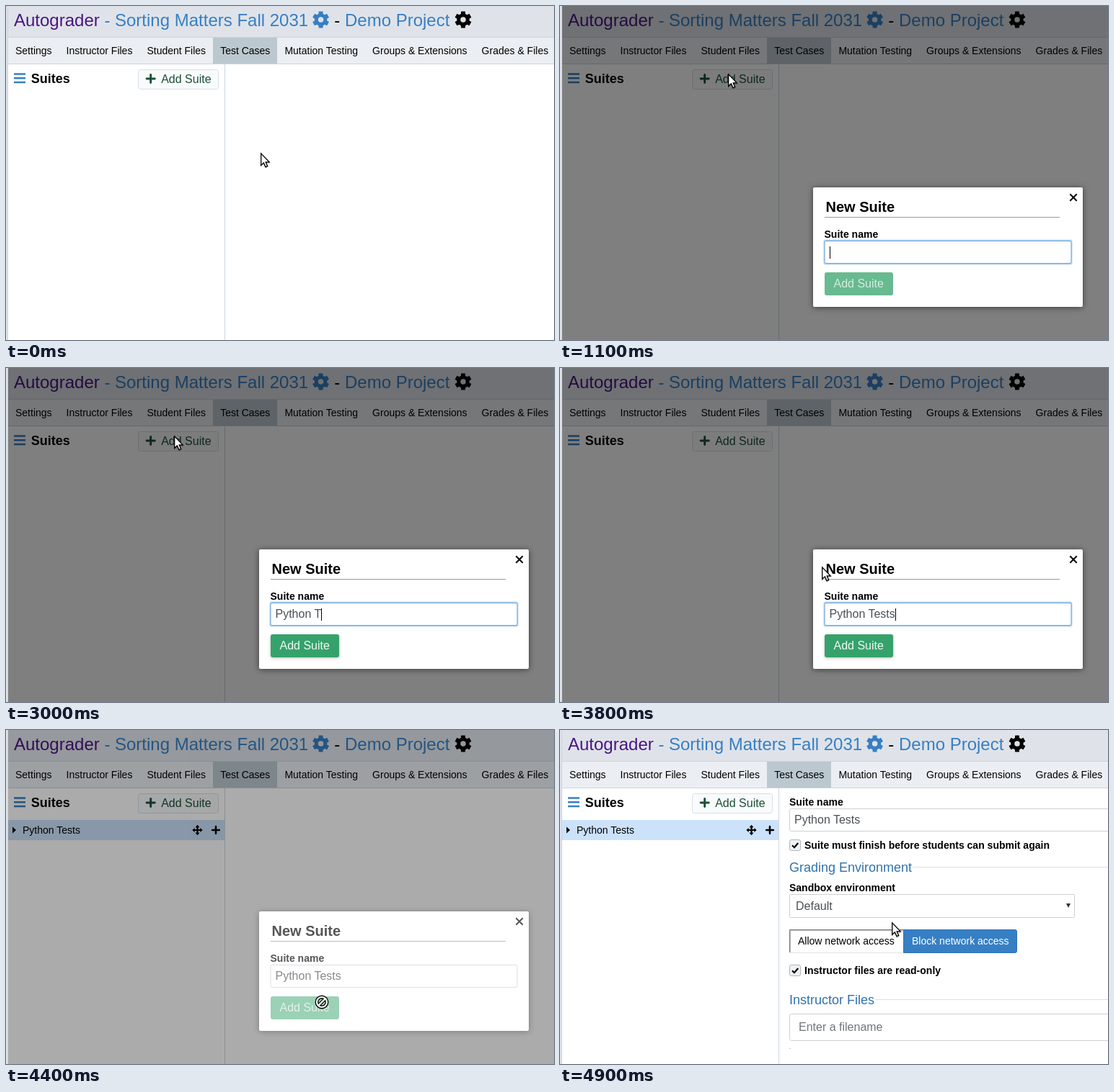
Write an HTML page that moves like this. It is 760x464 px and loops after 5900 ms.

```html
<!DOCTYPE html>
<html lang="en">
<head>
<meta charset="utf-8">
<title>New suite</title>
<style>
html, body { margin: 0; width: 100%; height: 100%; overflow: hidden; background: #fff; }
svg { display: block; }
text { font: 14px "Liberation Sans", Arial, sans-serif; white-space: pre; }
.b { font-weight: bold; }
.m { font-size: 16px; }
.l { font-size: 18px; }
.xl { font-size: 24px; }
.blue { fill: #377fc4; }
.legend { fill: #2f72ae; }
.green { fill: #1b5038; }
.value { fill: #495057; }
.box { fill: #fff; stroke: #ccd0d4; }
.rule { stroke: #dcdfe2; }
#dialog { filter: drop-shadow(0 1px 4px rgba(0,0,0,.55)); }
#arrow, #hand { fill: #fff; stroke: #000; stroke-width: 1.3; filter: drop-shadow(.5px 1px .5px rgba(0,0,0,.3)); }
</style>
</head>
<body>
<svg width="760" height="464" viewBox="0 0 760 464">
  <defs>
    <g id="gear">
      <circle r="8.7"/>
      <rect id="tooth" x="-3" y="-11.5" width="6" height="23" rx=".7"/>
      <use href="#tooth" transform="rotate(60)"/>
      <use href="#tooth" transform="rotate(120)"/>
      <circle r="3.75" fill="#dfe3e9"/>
    </g>
    <path id="plus" d="M-5.6 0H5.6M0-5.6V5.6" stroke-width="2.9" stroke-linecap="round"/>
    <g id="check">
      <rect x=".5" y=".5" width="15" height="15" rx="2.5" fill="#f0f2f5" stroke="#b0b6bd"/>
      <path d="M4 8.3L7 11.2 12.2 5" fill="none" stroke="#000" stroke-width="2.2"/>
    </g>
    <path id="arrowhead" d="M0-7.2L3-3.8H1V-1H-1V-3.8H-3Z"/>
    <path id="noEntry" d="M-7 0A7 7 0 0 1 7 0A7 7 0 0 1 -7 0M-4.6 4.6L4.6-4.6"/>
  </defs>

  <rect width="760" height="43" fill="#dfe3e9"/>
  <rect y="43" width="760" height="38" fill="#ccd3da"/>
  <rect y="44" width="760" height="36" fill="#ebeff3"/>
  <rect x="287" y="44" width="89" height="36" fill="#bbc8d0"/>
  <text class="xl" x="11" y="28" fill="#4b1582">Autograder</text>
  <text class="xl blue" x="136.4" y="28">-</text>
  <text class="xl blue" x="151" y="28">Sorting Matters Fall 2031</text>
  <use href="#gear" class="blue" x="436.6" y="19"/>
  <text class="xl" x="455.3" y="28">-</text>
  <text class="xl blue" x="470" y="28">Demo Project</text>
  <use href="#gear" x="634" y="19"/>
  <g id="tabs"></g>

  <path d="M11 94.6H27M11 100.3H27M11 105.9H27" stroke="#377fc4" stroke-width="2.5"/>
  <text class="b l" x="34.8" y="107">Suites</text>
  <rect x="183.5" y="88.5" width="111" height="27" rx="3" fill="#f9fafb" stroke="#d7e0e6"/>
  <use href="#plus" x="200.7" y="101" stroke="#1b5038"/>
  <text class="m green" x="215.2" y="107">Add Suite</text>
  <path d="M303.5 81V464" stroke="#ccd6dc"/>

  <g id="row">
    <rect x="3" y="125" width="300" height="28" fill="#cbe2fa"/>
    <path d="M9 134.5L14 139 9 143.5Z"/>
    <text x="23" y="144">Python Tests</text>
    <g transform="translate(265.5 139)">
      <path d="M-5 0H5M0-5V5" stroke="#000" stroke-width="1.8"/>
      <use href="#arrowhead"/>
      <use href="#arrowhead" transform="rotate(90)"/>
      <use href="#arrowhead" transform="rotate(180)"/>
      <use href="#arrowhead" transform="rotate(270)"/>
    </g>
    <use href="#plus" transform="translate(291 139) scale(.87)" stroke="#000"/>
  </g>

  <g id="panel">
    <text class="b" x="318" y="105">Suite name</text>
    <rect class="box" x="318.5" y="109.5" width="460" height="31" rx="2"/>
    <text class="m value" x="325" y="130">Python Tests</text>
    <use href="#check" x="318" y="152"/>
    <text class="b" x="339" y="165">Suite must finish before students can submit again</text>
    <text class="l legend" x="318" y="197">Grading Environment</text>
    <path class="rule" d="M489 190.5H760M437 374.5H760"/>
    <text class="b" x="318" y="224">Sandbox environment</text>
    <rect class="box" x="318.5" y="228.5" width="395" height="32" rx="1"/>
    <text class="m value" x="327" y="250">Default</text>
    <path d="M702 241H708L705 247Z" fill="#333"/>
    <rect x="318.5" y="277.5" width="158" height="32" rx="2" fill="#fff" stroke="#dfe2e5"/>
    <path d="M319.5 309V278.5H476" fill="none" stroke="#bbb"/>
    <path d="M318.5 309V277.5H476" fill="none" stroke="#777"/>
    <text x="330" y="298">Allow network access</text>
    <path class="blue" d="M476.5 277.5H631Q633.5 277.5 633.5 280V307Q633.5 309.5 631 309.5H476.5Z" stroke="#3174b5"/>
    <text x="488" y="298" fill="#fff">Block network access</text>
    <use href="#check" x="318" y="326"/>
    <text class="b" x="339" y="339">Instructor files are read-only</text>
    <text class="l legend" x="318" y="381">Instructor Files</text>
    <rect class="box" x="318.5" y="394.5" width="460" height="37" rx="3"/>
    <text class="m" x="331" y="418" fill="#70767c">Enter a filename</text>
    <rect x="318" y="442" width="2" height="1" fill="#ccc"/>
  </g>

  <g id="modal">
    <rect x="3" width="757" height="464" fill-opacity=".5"/>
    <rect id="dialog" x="351" y="252" width="374" height="166" rx="2" fill="#fff"/>
    <path d="M707.3 261.3L716.7 270.7M716.7 261.3L707.3 270.7" stroke="#000" stroke-width="2"/>
    <text class="b" x="368.5" y="286" style="font-size:20px">New Suite</text>
    <path d="M367 293.5H693" stroke="#999"/>
    <text class="b" x="366.5" y="322">Suite name</text>
    <rect id="glow" x="366.5" y="325.5" width="343" height="33" rx="2" fill="none" stroke="#b5d3f0" stroke-width="2"/>
    <rect id="field" class="box" x="367" y="326.5" width="342" height="31" rx="2"/>
    <text id="typed" class="m value" x="373.5" y="347"></text>
    <rect id="caret" y="334" width="1" height="17"/>
    <g id="button">
      <rect id="face" x="367" y="370" width="95" height="32" rx="3"/>
      <text id="caption" class="m" x="379.5" y="391" fill="#fff">Add Suite</text>
    </g>
  </g>

  <path id="arrow" d="M.7 .8V17.2L4.4 13.8 7 19.6 9.7 18.4 7.2 12.8H12.2Z"/>
  <path id="hand" d="M4.5 11V2Q6 0 7.5 2V7.5Q9 6.5 10 8 11.5 7 12.5 8.5 14.5 7.8 15.5 10V15L13.5 20.5H6.5L1 13Q1 10.5 4.5 13Z"/>
  <g id="denied" fill="none">
    <use href="#noEntry" stroke="#000" stroke-width="4.8"/>
    <use href="#noEntry" stroke="#fff" stroke-width="2.2"/>
  </g>

  <rect width="3" height="464" fill="#dfe3e9"/>
  <path d="M2.5 0V464" stroke="#ccd3da"/>
</svg>
<script>
const LOOP = 5900, STEP = 100;
const NAME = "Python Tests";
const $ = id => document.getElementById(id);
const show = (id, on) => $(id).style.display = on ? "" : "none";
const set = (id, attrs) => { for (const k in attrs) $(id).setAttribute(k, attrs[k]); };

// Value of the last [time, ...value] entry that has been reached
const at = (keys, t) => keys.filter(k => k[0] <= t).pop().slice(1);

function layTabs(labels) {
  let x = 13;
  for (const label of labels) {
    $("tabs").insertAdjacentHTML("beforeend", `<text x="${x}" y="67">${label}</text>`);
    x += $("tabs").lastChild.getComputedTextLength() + 20;
  }
}
layTabs(["Settings", "Instructor Files", "Student Files", "Test Cases",
  "Mutation Testing", "Groups &amp; Extensions", "Grades &amp; Files"]);

const fade = [[0, 0], [1000, .5], [1100, 1], [4400, .66], [4500, .16], [4600, 0]];
const typing = [[0, 0], [2000, 1], [2200, 3], [2300, 5], [2500, 6], [2600, 7],
  [3000, 8], [3100, 9], [3200, 10], [3300, 12]];
const pointer = [[0, "arrow", 353, 204], [400, "arrow", 298, 155], [600, "arrow", 246, 109],
  [700, "hand", 229, 94], [1000, "arrow", 233, 94], [4000, "hand", 430, 375], [4300, "denied", 438, 378],
  [4600, "arrow", 434, 375], [4800, "arrow", 452, 310], [4900, "arrow", 460, 267]];

function cursorAt(t) {
  if (t < 3600 || t >= 4000) return at(pointer, t);
  const p = (t - 3500) / 500, e = p * p * (3 - 2 * p);
  return ["arrow", 233 + 201 * e, 94 + 281 * e];
}

function draw(t) {
  show("row", t >= 4400);
  show("panel", t >= 4500);
  $("modal").style.opacity = at(fade, t)[0];

  const count = at(typing, t)[0], focused = t < 4100;
  $("typed").textContent = NAME.slice(0, count);
  show("glow", focused);
  set("field", { style: focused ? "stroke:#6ba3db" : "" });
  const blinkOff = (t >= 1700 && t < 2000) || t >= 3900;
  show("caret", !blinkOff);
  set("caret", { x: Math.round(373.5 + (count ? $("typed").getComputedTextLength() : 0)) });

  const enabled = count > 0 && t < 4200;
  set("face", { fill: !enabled ? "#68ba90" : t >= 4000 ? "#2f9560" : "#36a26b" });
  set("caption", { opacity: enabled ? .93 : .72 });
  $("button").style.filter = enabled ? "drop-shadow(0 1px 2px rgba(0,0,0,.25))" : "";

  const [shape, x, y] = cursorAt(t);
  for (const id of ["arrow", "hand", "denied"]) show(id, id === shape);
  set(shape, { transform: `translate(${Math.round(x)} ${Math.round(y)})` });
}

let last = -1;
function tick() {
  const t = Math.floor(performance.now() % LOOP / STEP) * STEP;
  if (t !== last) draw(last = t);
  requestAnimationFrame(tick);
}
tick();
</script>
</body>
</html>
```
